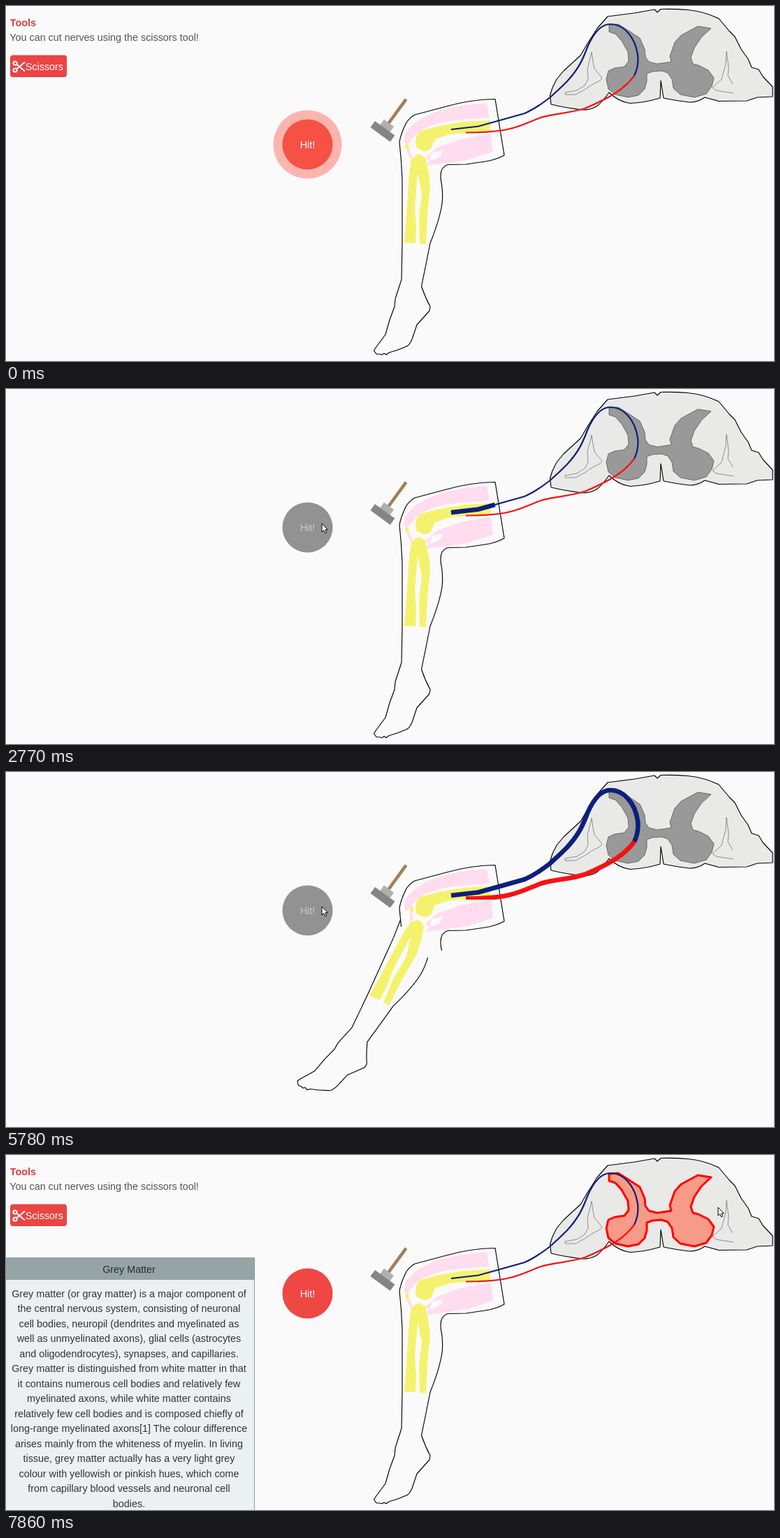
An HTML page that plays this animation: 1099x509 px, repeating every 8000 ms.

```html
<!DOCTYPE html>
<html lang="en">
<head>
<meta charset="utf-8">
<title>Knee reflex</title>
<style>
html, body { margin: 0; width: 100%; height: 100%; overflow: hidden; background: #fafafa; }
svg { display: block; width: 1099px; height: 509px; font: 14.35px "Liberation Sans", Arial, sans-serif; }
.line { fill: none; stroke: #000; stroke-width: 1.15; stroke-linejoin: round; }
.thin { fill: none; stroke: #777; stroke-width: .8; }
.pink { fill: #ffdcee; }
.bone { fill: #f4f26d; }
.nerve { fill: none; stroke-width: 2.2; }
.blue { stroke: #0c1f7c; }
.red { stroke: #f51212; }
.signal { stroke-width: 6.6; stroke-dasharray: 1 2; }
#grey { fill: #999; stroke: #555; stroke-width: .8; stroke-linejoin: round; }
#grey.picked { fill: #f79a88; stroke: #f00; stroke-width: 3; }
.mid { text-anchor: middle; }
.pointer { fill: #fff; stroke: #000; stroke-width: 1; stroke-linejoin: round; }
</style>
</head>
<body>
<svg viewBox="0 0 1099 509">
  <rect width="1099" height="509" fill="#fafafa"/>

  <g id="tools">
    <text x="5.8" y="29" font-weight="bold" fill="#d83f3f">Tools</text>
    <text x="5.3" y="50" fill="#555">You can cut nerves using the scissors tool!</text>
    <rect x="6" y="70.5" width="81" height="31.5" rx="4" fill="#ea4444"/>
    <g fill="none" stroke="#fff" stroke-width="2">
      <circle cx="13" cy="82" r="2.6"/><circle cx="13" cy="92" r="2.6"/>
      <path d="M15 83.5L27 93.5M15 90.5L27 80.5"/>
    </g>
    <text x="27.8" y="92" fill="#fff">Scissors</text>
  </g>

  <g id="panel">
    <rect x="-1" y="147.5" width="356.5" height="370" fill="#ecf0f1" stroke="#87979a"/>
    <rect x="0" y="148" width="355" height="31" fill="#95a5a6"/>
    <text class="mid" x="176" y="169" fill="#2b2b2b">Grey Matter</text>
    <g id="article" class="mid" fill="#333"></g>
  </g>

  <circle id="ring" cx="431.5" cy="198.5" fill="#ff4432"/>
  <circle id="button" cx="431.5" cy="198.5" r="36"/>
  <text id="label" class="mid" x="431.5" y="203.5">Hit!</text>

  <path class="line" style="fill:#e9e9e8" d="M780 141L778.5 128L782 117L788 105L798 93L810 82L822 71L832 54L846 32L861 15L900 10L928 5L932 9L937 4.500Q960 4 975 5.500Q1000 8 1020 18L1035 36L1043 44L1052 62L1062 76L1067 88L1077 91L1083 101L1097 116L1097 130L1075 131L1060 136L1020 136.500L1000 131Q990 138 978 138Q960 136 941 132L937 107L936 132Q912 139 893 139.500Q876 137 863 124Q853 138 845 144Q836 149 826 149Q800 146 780 141Z"/>
  <path id="grey" d="M863 27L876 26L892 36L907 46L914 62L915 73L920 80L932 83L952 80L950 72L957 52L966 42L990 29L1009 32L995 45L985 60L980 74L983 83L991 85L1005 92L1013 103L1010 115L1002 126L985 131L965 127L955 118L953 105L947 96L938 93L925 94L917 97L917 108L914 119L905 128L890 131L872 127L862 119L859 105L862 93L871 89L885 87L891 79L890 66L881 50L872 40L863 37Z"/>
  <path class="thin" d="M838 66L840 80L842 90L853 103L850 107L840 112L828 120L815 127L800 127L800 124L817 121L828 114L833 105L832 90L836 75ZM1031 65L1030 82L1024 105L1011 117L1016 121L1041 125M1031 65L1034 88L1033 100L1040 112"/>

  <g id="shin">
    <path class="bone" d="M580 219L590 212L600 217L605 240L607 258L603 300L601 341.5L592 341L591 303L595 268L589 239L585 290L587 315L586 340L570 340L573 300L577 240Z"/>
    <path class="bone" d="M571 199L576 198L577 207L572 205Z"/>
    <path class="pink" d="M573 207L577 206L582 216L579 219Z"/>
    <path class="line" d="M623.500 256Q625.500 271 624 283Q621 305 607 340L600 375L594.5 402Q600 418 607 431L606 437L588 457L581 478Q577 487 573 488Q560 494 548 497L544 500L541 498L538 500L534 499L530 499L526.5 494L529 490L543 471L549 450L556 431L557 420L566 392L567 340L567 250L565.5 222"/>
  </g>
  <path class="pink" d="M688 139L691.5 160L650 163C620 166 601 172 587 184L574 199L569.500 195L571 184C580 168 595 160 615 152C640 144 660 141 688 139Z"/>
  <path class="pink" fill-rule="evenodd" d="M694 183L697 209L660 221L625 226L603 229L602 226L606 222L600 218L617 203L650 191ZM606 221L610 210L625 207L622 215L612 221Z"/>
  <path class="bone" d="M693 164L693 179L635 184L614 191L608 205Q603 209 597 208L587 203L586 197L587 187L593 179L620 172L655 166Z"/>
  <path class="line" d="M565.5 222L563 195Q565 183 573 167Q579 159 585 156L630 144Q665 134 700 133.500L713 214Q700 221 685 223L658 227L632 227.500Q618 232 623.500 256"/>

  <clipPath id="above"><rect width="1099" height="183"/></clipPath>
  <g id="nerves"></g>

  <g id="hammer">
    <rect x="1.3" y="-38" width="4.6" height="44" fill="#a0805a"/>
    <rect x="-5" y="4" width="17.500" height="10" fill="#b0b0b0"/>
    <rect x="-14" y="13.500" width="35" height="11.200" fill="#858585"/>
  </g>

  <g id="cursor">
    <path id="arrow" class="pointer" d="M0 0V12L2.700 9.600L4.600 13.800L6.600 12.900L4.800 8.800H8.300Z"/>
    <path id="hand" class="pointer" d="M0 1Q1.500 -1 3 1V5.500L9 7Q10.500 7.500 10 10L8.500 16H2L-3.500 9.500Q-3 7 -.500 9ZM4 7V9M6.500 7.500V9.500"/>
  </g>
</svg>
<script>
const $ = id => document.getElementById(id);
const show = (id, on) => { $(id).style.display = on ? '' : 'none'; };
const set = (id, attrs) => { for (const k in attrs) $(id).setAttribute(k, attrs[k]); };
const span = (t, a, b) => Math.min(1, Math.max(0, (t - a) / (b - a)));
const ease = u => (1 - Math.cos(Math.PI * u)) / 2;
const mix = (a, b, u) => a + (b - a) * u;

const LOOP = 8000, CLICK = 1170, RESET = 6330, PICK = 7390;

const sensory = 'M637 177L676 172.500L710 163L742 154Q758 147 778 131.500Q790 121 802 109C820 90 826 75 832 59C842 36 853 26 865 26C884 26 900 44 904 70C905.500 83 903 92 899 100';
const motor = 'M899 100C886 118 866 131 828 147C806 154 784 154 765 160C749 166 733 175 712 178Q690 181.500 658 181.500';
const nerve = (d, color, id) =>
  `<path class="nerve ${color}" d="${d}"/><path id="${id}" class="nerve ${color} signal" pathLength="1" d="${d}"/>`;
$('nerves').innerHTML = nerve(sensory, 'blue', 'signalIn') +
  `<g clip-path="url(#above)">${nerve(motor, 'red', 'signalOut')}</g>`;

const article = `Grey matter (or gray matter) is a major component of
the central nervous system, consisting of neuronal
cell bodies, neuropil (dendrites and myelinated as
well as unmyelinated axons), glial cells (astrocytes
and oligodendrocytes), synapses, and capillaries.
Grey matter is distinguished from white matter in that
it contains numerous cell bodies and relatively few
myelinated axons, while white matter contains
relatively few cell bodies and is composed chiefly of
long-range myelinated axons[1] The colour difference
arises mainly from the whiteness of myelin. In living
tissue, grey matter actually has a very light grey
colour with yellowish or pinkish hues, which come
from capillary blood vessels and neuronal cell
bodies.`;
$('article').innerHTML = article.split('\n')
  .map((line, i) => `<text x="176" y="${203.5 + i * 21.53}">${line}</text>`).join('');

// Cursor stops: time, x, y
const stops = [[70, 908, 468], [900, 452, 193], [6400, 452, 193], [7060, 990, 90], [7450, 990, 90], [7820, 1019, 75]];

function cursorAt(t) {
  let i = 0;
  while (i < stops.length - 2 && t >= stops[i + 1][0]) i++;
  const [a, b] = [stops[i], stops[i + 1]];
  const u = ease(span(t, a[0], b[0]));
  return [mix(a[1], b[1], u), mix(a[2], b[2], u)];
}

function signal(id, progress) {
  show(id, progress > 0);
  set(id, { 'stroke-dashoffset': 1 - progress });
}

function draw(t) {
  const busy = t >= CLICK && t < RESET;
  const [x, y] = cursorAt(t);
  const hover = !busy && t >= 70 && Math.hypot(x - 431.5, y - 198.5) < 36;

  show('tools', !busy);
  show('panel', t >= PICK);
  $('grey').classList.toggle('picked', t >= PICK);

  const pulse = (t / 1000 + .72) % 1;
  show('ring', t < CLICK);
  set('ring', { r: 36 + 18 * pulse, opacity: .6 * (1 - pulse ** 3) });
  set('button', { fill: busy ? '#929292' : hover ? '#ea4444' : t < CLICK ? '#f55145' : '#ef4744' });
  set('label', { fill: busy ? '#c8c8c8' : '#fff' });

  const swing = -20 * (ease(span(t, CLICK, 1530)) - ease(span(t, 1740, 2540)));
  set('hammer', { transform: `translate(547.3 162.3) rotate(${36 + swing})` });

  signal('signalIn', busy ? 1 - (1 - span(t, 2575, 4010)) ** 1.23 : 0);
  signal('signalOut', busy ? span(t, 4122, 5315) : 0);

  const kick = busy ? 28 * ease(span(t, 5490, 5870)) : 0;
  set('shin', { transform: `rotate(${kick} 590 215)` });

  show('cursor', t >= 70);
  show('hand', hover);
  show('arrow', !hover);
  set('cursor', { transform: `translate(${x} ${y})` });
}

function frame() {
  draw(performance.now() % LOOP);
  requestAnimationFrame(frame);
}
draw(0);
requestAnimationFrame(frame);
</script>
</body>
</html>
```
